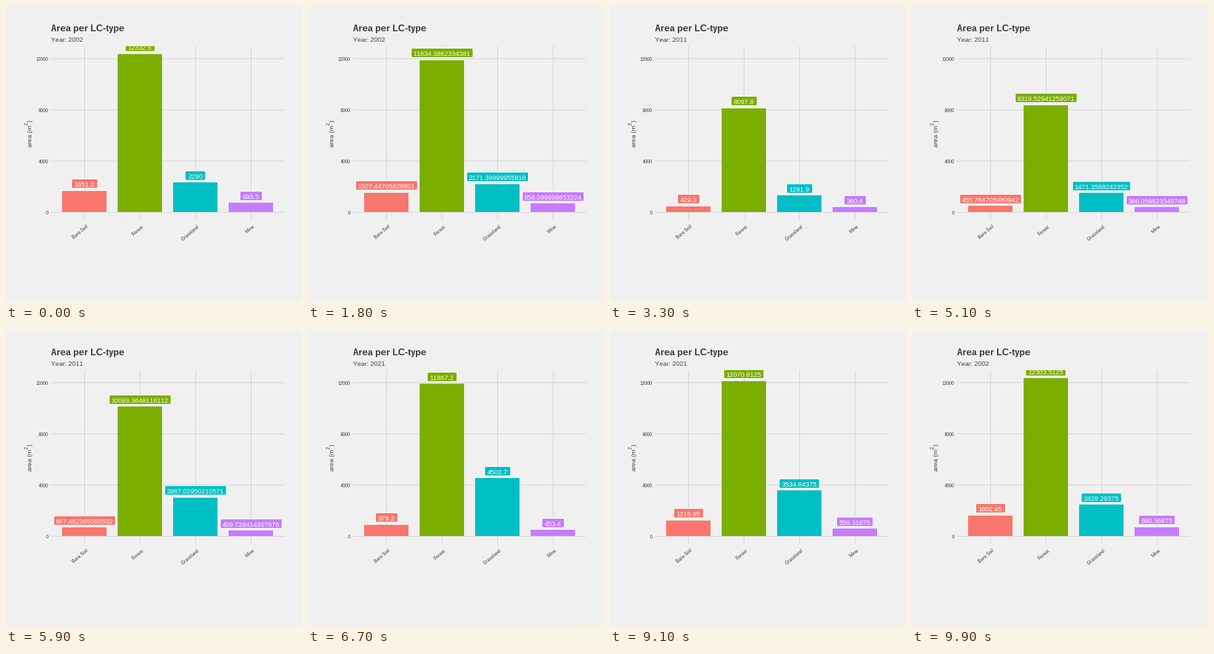
A matplotlib script that plays this animation: 480 by 480 pixels, repeating every 10 s.

```python
import math

import matplotlib.pyplot as plt
import numpy as np
from matplotlib.animation import FuncAnimation
from matplotlib.patches import FancyBboxPatch, Rectangle

plt.rcParams["font.family"] = "Liberation Sans"
plt.rcParams["text.hinting"] = "default"
plt.rcParams["text.hinting_factor"] = 1

SIZE, DPI = 480, 80
BG, GRID, INK = "#F0F0F0", "#D2D2D2", "#3C3C3C"
LEFT, RIGHT, TOP, BOTTOM = 73, 451, 65, 347
ZERO, SCALE = 334.4, 0.02079
BAR_W = 72

TYPES = ["Bare Soil", "Forest", "Grassland", "Mine"]
COLORS = ["#F8766D", "#7CAE00", "#00BFC4", "#C77CFF"]
CENTERS = [127, 217, 307, 397]
YEARS = [2002, 2011, 2021]
AREAS = np.array([
    [1651.2, 12332.6, 2290, 695.5],
    [429.3, 8097.8, 1281.9, 360.6],
    [879.2, 11867.2, 4502.7, 453.4],
])
# (last still frame, steps to the next state)
MOVES = [(16, 17), (50, 17), (84, 16)]

fig = plt.figure(figsize=(SIZE / DPI, SIZE / DPI), dpi=DPI, facecolor=BG)
ax = fig.add_axes([0, 0, 1, 1])
ax.set_xlim(0, SIZE)
ax.set_ylim(SIZE, 0)
ax.axis("off")


def points(px):
    return px * 72 / DPI


def write(x, y, text, px, color=INK, **kw):
    kw.setdefault("va", "baseline")
    return ax.text(x, y, text, fontsize=points(px), color=color, **kw)


def box(x, y, w, h, color, z):
    return ax.add_patch(Rectangle((x, y), w, h, fc=color, lw=0,
                                  antialiased=False, zorder=z))


def height(value):
    return ZERO - value * SCALE


# Static parts
write(73, 41, "Area per LC-type", 15, weight="bold")
subtitle = write(73, 58, "", 10)

for value in range(0, 12001, 4000):
    row = round(height(value))
    box(LEFT, row, RIGHT - LEFT, 1, GRID, 1)
    write(69, row + 4, str(value), 8, ha="right")

for x, name in zip(CENTERS, TYPES):
    box(x, TOP, 1, BOTTOM - TOP, GRID, 1)
    write(x + 6.5, 358.5, name, 8, ha="right", rotation=40,
          rotation_mode="anchor")

for x, y, text, px in [(42, 229, "area (m", 10), (36, 193, "2", 8),
                       (42, 188, ")", 10)]:
    write(x, y, text, px, rotation=90, rotation_mode="anchor")

# Moving parts
panel = Rectangle((LEFT, TOP), RIGHT - LEFT, BOTTOM - TOP,
                  transform=ax.transData)
bars, tags, values = [], [], []
for x, color in zip(CENTERS, COLORS):
    bars.append(box(x - BAR_W / 2, ZERO, BAR_W, 0, color, 2))
    tag = FancyBboxPatch((x, ZERO), 1, 1, fc=color, ec="white",
                         lw=points(1), zorder=3,
                         boxstyle="round,pad=0,rounding_size=2")
    ax.add_patch(tag)
    tag.set_clip_path(panel)
    tags.append(tag)
    label = write(x, ZERO, "", 10, "white", ha="center", zorder=4,
                  clip_on=True)
    label.set_clip_path(panel)
    values.append(label)


def state(frame):
    """Return the areas and the year shown at a frame."""
    for i, (start, steps) in enumerate(MOVES):
        if frame <= start:
            return AREAS[i], YEARS[i]
        if frame < start + steps:
            j = (i + 1) % len(YEARS)
            step = frame - start
            # single precision gives the long decimals in the labels
            p = float(np.float32(step / steps))
            areas = AREAS[i] + (AREAS[j] - AREAS[i]) * p
            return areas, YEARS[j if step > math.ceil(steps / 2) else i]
    return AREAS[0], YEARS[0]


def draw(frame):
    areas, year = state(frame)
    subtitle.set_text(f"Year: {year}")
    for x, area, bar, tag, label in zip(CENTERS, areas, bars, tags, values):
        y = height(area)
        bar.set_y(math.floor(y))
        bar.set_height(math.floor(ZERO) - math.floor(y))
        text = f"{area:.15g}"
        dots = text.count(".")
        w = 5.8 * (len(text) - dots) + 3 * dots + 10
        tag.set_bounds(round(x - w / 2) + 0.5, round(y) - 19.5, round(w), 15)
        label.set_text(text)
        label.set_y(round(y) - 7)
    return [subtitle, *bars, *tags, *values]


anim = FuncAnimation(fig, draw, frames=100, interval=100, repeat=True,
                     repeat_delay=0, blit=False)
plt.show()
```
